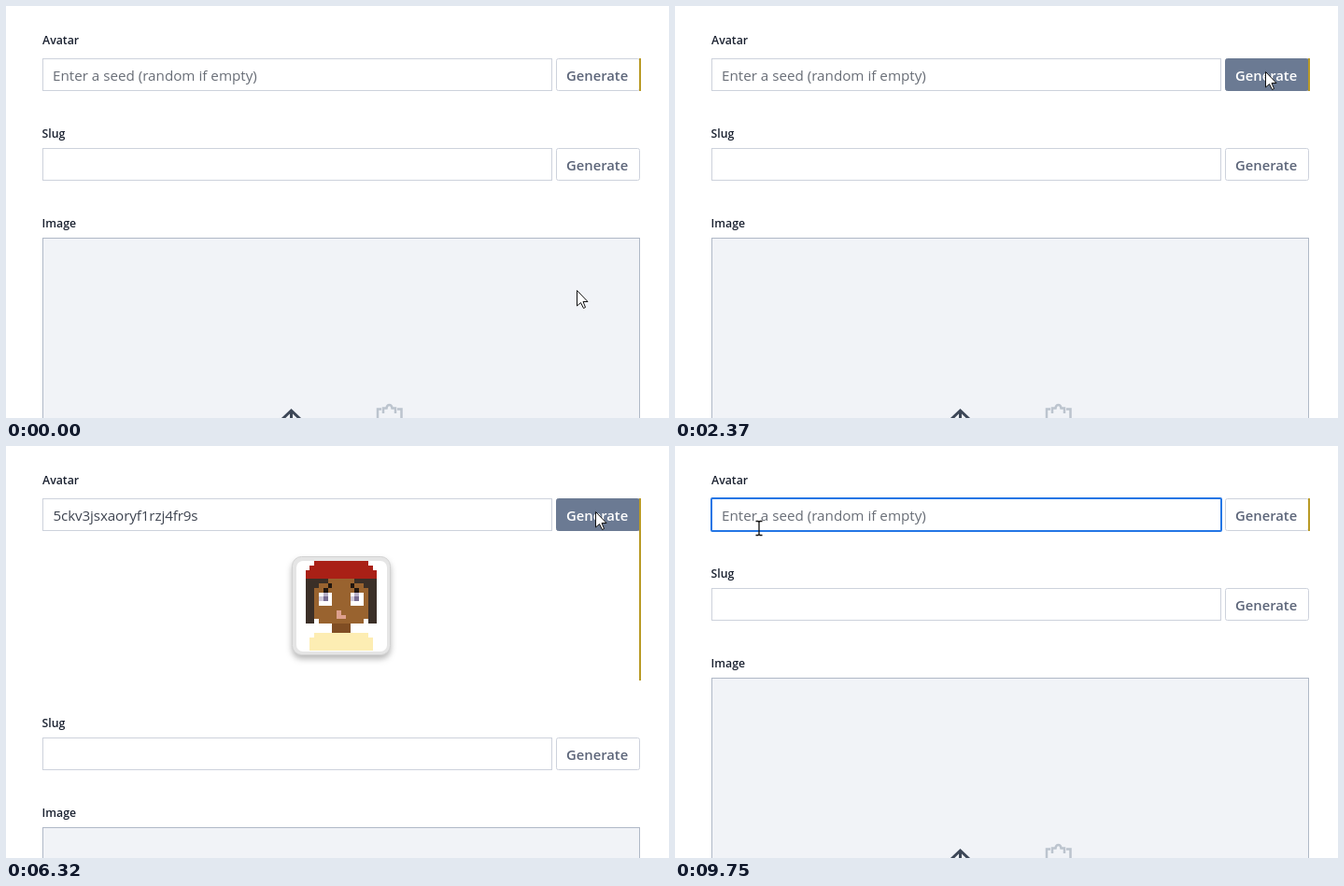
Animation of 710 by 441 pixels, one loop 9.93 s. Source, as an HTML page:

```html
<!DOCTYPE html>
<html lang="en">
<head>
<meta charset="utf-8">
<title>Avatar field</title>
<style>
  html, body { margin: 0; width: 100%; height: 100%; overflow: hidden; background: #fff; }
  svg { display: block; width: 710px; height: 441px; }
  text { font: 15.2px "Open Sans", "Noto Sans", sans-serif; white-space: pre; }
  .label { font-size: 12.3px; font-weight: 600; fill: #1a2130; }
  .box { fill: #fff; stroke: #cdd2dc; }
  .btn text { font-size: 14.8px; font-weight: 600; fill: #5c6579; }
  .btn.hover rect { fill: #6b7a93; stroke: #6b7a93; }
  .btn.hover text { fill: #fff; }
  #seed { letter-spacing: -.12px; fill: #3e4450; }
  #hint { fill: #686d76; }
  #card { filter: drop-shadow(0 4px 3px rgba(0, 0, 0, .28)); }
  #faces { shape-rendering: crispEdges; }
  #spot { mix-blend-mode: multiply; }
</style>
</head>
<body>
<svg viewBox="0 0 710 441">
  <text class="label" x="39" y="41">Avatar</text>
  <rect class="box" x="39.5" y="56.5" width="545" height="34"/>
  <rect id="sel" y="64" height="20" fill="#cfe1fb"/>
  <text id="hint" x="50" y="80">Enter a seed (random if empty)</text>
  <text id="seed" x="50.5" y="80"></text>
  <path id="caret" d="M51.5 65V84" stroke="#333"/>
  <rect id="focus" x="39" y="56" width="546" height="35" rx="1" fill="none" stroke="#2476e5" stroke-width="2"/>
  <g class="btn" id="btnA">
    <rect class="box" x="589.5" y="56.5" width="89" height="34" rx="2"/>
    <text x="600" y="80">Generate</text>
  </g>
  <rect id="bar" x="678" y="56" width="2" fill="#b99a25"/>

  <g id="preview">
    <rect id="card" x="306.5" y="118.5" width="105" height="105" rx="10" fill="#e5e5e5" stroke="#d2d2d2"/>
    <rect x="311" y="123" width="97" height="97" rx="7" fill="#fff"/>
    <g id="faces" transform="translate(311 123) scale(4.8)"></g>
  </g>

  <g id="low">
    <text class="label" x="38.5" y="141">Slug</text>
    <rect class="box" x="39.5" y="152.5" width="545" height="34"/>
    <g class="btn" id="btnS">
      <rect class="box" x="589.5" y="152.5" width="89" height="34" rx="2"/>
      <text x="600" y="176">Generate</text>
    </g>
    <text class="label" x="38.5" y="237">Image</text>
    <rect x="39.5" y="248.5" width="639" height="320" fill="#f1f3f7" stroke="#b0b9c7"/>
    <g fill="none" stroke-width="3">
      <path d="M294 444L305.500 433L317 444M305.500 433V460" stroke="#3d4757"/>
      <path d="M402 431.500H398V460M419 431.500H423.500V460M404 436V430.500H407.500Q408 427 410.500 427T413.500 430.500H417V436" stroke="#bcc4ce" stroke-width="2.500"/>
    </g>
  </g>

  <circle id="spot" r="12" fill="#fff56a"/>
  <path id="arrow" d="M.5.500V17L4.500 13.500L7.500 19.500L9.500 18.500L7 12.500H12Z" fill="#fff" stroke="#111"/>
  <path id="beam" d="M-3.500-7.500H-1L0-6.500L1-7.500H3.500M0-7V7M-3.500 7.500H-1L0 6.500L1 7.500H3.500" fill="none" stroke="#111" stroke-width="1.300"/>
</svg>
<script>
const LOOP = 9930;
const $ = id => document.getElementById(id);
const show = (id, on) => $(id).setAttribute('visibility', on ? 'inherit' : 'hidden');
const set = (id, attr, value) => $(id).setAttribute(attr, value);

// Avatars on a 20 x 20 grid
let face;
function pix(fill, x, y, w = 1, h = 1) {
  const r = document.createElementNS('http://www.w3.org/2000/svg', 'rect');
  Object.entries({ fill, x, y, width: w, height: h }).forEach(([k, v]) => r.setAttribute(k, v));
  face.append(r);
}
function both(fill, x, y, w = 1, h = 1) {
  pix(fill, x, y, w, h);
  pix(fill, 20 - x - w, y, w, h);
}
function rows(fill, y, halves) {
  halves.forEach((n, i) => pix(fill, 10 - n, y + i, 2 * n));
}
function head(skin, chin, pupil, glint) {
  face = document.createElementNS('http://www.w3.org/2000/svg', 'g');
  $('faces').append(face);
  rows(skin, 2, [5, 6, 7, 7, 7, 7, 7, 7, 7, ...chin]);
  both('#fff', 5, 7, 3, 3);
  both(pupil, 6, 8);
  pix(glint, 5, 8);
  pix(glint, 12, 8);
}
function shirt(fill) {
  rows(fill, 16, [6, 7, 7, 7]);
}

function man() {
  const skin = '#ebc79e';
  head(skin, [7, 7, 6, 4, 2], '#66708f', '#d3d5e2');
  both(skin, 2, 7, 1, 3);
  rows('#000', 0, [1, 2]);
  both('#000', 6, 5);
  both('#000', 5, 6);
  both('#000', 7, 6);
  pix('#d4937f', 9, 12, 3);
  pix('#d4937f', 8, 13);
  shirt('#d5dc9c');
  rows('#c0ca62', 16, [1, 2, 1, 1]);
}
function braid() {
  const hair = '#594735', skin = '#fddcb6', top = '#f57c37';
  head(skin, [6, 5, 4, 2, 2], '#56809a', '#a9c0cb');
  rows(hair, 1, [6, 7, 8]);
  pix(hair, 2, 4, 4);
  pix(hair, 15, 4, 3);
  both(hair, 2, 5, 2);
  both(hair, 2, 6);
  both('#30241c', 5, 6, 3);
  both('#30241c', 6, 5);
  both('#6d92a8', 6, 7);
  pix(hair, 2, 9, 1, 2);
  pix(hair, 2, 11, 2);
  pix(hair, 3, 12, 2);
  pix(hair, 2, 13, 2);
  pix(hair, 2, 14);
  pix(hair, 1, 15);
  pix('#d9182f', 9, 11, 1, 2);
  pix('#ee5a58', 10, 12);
  shirt(skin);
  for (let i = 0; i < 4; i++) both(top, 4, 16 + i, i + 1);
}
function cap() {
  const hair = '#3b2f27', skin = '#99632f';
  head(skin, [7, 6, 5, 2, 2], '#786d92', '#cfc8da');
  pix('#804d23', 8, 14, 4, 2);
  rows('#a92016', 0, [6, 7, 8, 8]);
  both(hair, 2, 4, 5);
  both(hair, 2, 5, 3);
  both(hair, 2, 6, 2, 8);
  both('#21170f', 7, 5);
  both('#21170f', 6, 6);
  both('#b6aec6', 6, 7);
  pix('#dea08e', 9, 11, 1, 2);
  pix('#dea08e', 10, 12);
  shirt('#fdedb3');
}
[man, braid, cap].forEach(draw => draw());
const faces = [...$('faces').children];
const seeds = ['rgmhrpe8588sbeinjluvu', 'k7o32598ofrl1etlsnys', '5ckv3jsxaoryf1rzj4fr9s'];

// Answers arrive about a second after each press; clearing also takes a round trip
const loaded = [3540, 5210, 6320];
const presses = [[1960, 2370], [3810, 4010], [5340, 5540], [7160, 7620]];
const CLEAR = 8070, CLOSE = 9160;

// Pointer path: time, x, y
const path = [
  [0, 611, 304], [250, 611, 304], [450, 624, 278], [650, 641, 236], [800, 645, 200],
  [950, 650, 133], [1060, 646, 98], [1140, 641, 78], [1270, 641, 78], [1320, 635, 70],
  [1830, 635, 70], [1960, 632, 70], [6320, 632, 70], [6430, 560, 72], [6700, 265, 76],
  [6830, 214, 76], [7160, 208, 76], [7390, 41, 71], [7480, 22, 70], [7990, 22, 70],
  [8220, 90, 88], [LOOP, 90, 88]
];
function pointer(t) {
  const i = path.findIndex(p => p[0] > t);
  const [t0, x0, y0] = path[i - 1], [t1, x1, y1] = path[i];
  const k = (t - t0) / (t1 - t0);
  return [x0 + (x1 - x0) * k, y0 + (y1 - y0) * k];
}

function draw(t) {
  const within = (a, b) => t >= a && t < b;
  const [x, y] = pointer(t);
  const open = within(loaded[0], CLOSE), drag = within(...presses[3]);
  const filled = within(loaded[0], CLEAR);
  const n = loaded.filter(s => t >= s).length - 1;

  show('preview', open);
  faces.forEach((f, i) => f.setAttribute('visibility', i === n ? 'inherit' : 'hidden'));
  set('low', 'transform', `translate(0 ${open ? 160 : 0})`);
  set('bar', 'height', open ? 195 : 35);

  $('seed').textContent = filled ? seeds[n] : '';
  show('hint', !filled);
  show('focus', t >= presses[3][0]);
  const left = Math.min(206, Math.max(51, x));
  set('sel', 'x', left);
  set('sel', 'width', within(presses[3][0], CLEAR) ? 206 - left : 0);
  show('caret', within(CLEAR, 8600) || within(9160, 9750));

  const over = (a, b, top) => x >= a && x < b && y >= top && y < top + 35;
  $('btnA').classList.toggle('hover', over(589, 679, 56));
  $('btnS').classList.toggle('hover', over(589, 679, open ? 312 : 152));

  const text = drag || over(39, 585, 56);
  const at = `translate(${Math.round(x)} ${Math.round(y)})`;
  set('arrow', 'transform', at);
  set('beam', 'transform', at);
  show('arrow', !text);
  show('beam', text);
  set('spot', 'transform', `translate(${text ? x - 3 : x} ${y})`);
  show('spot', presses.some(p => within(...p)));
}

const start = performance.now();
function tick() {
  draw((performance.now() - start) % LOOP);
  requestAnimationFrame(tick);
}
tick();
</script>
</body>
</html>
```
